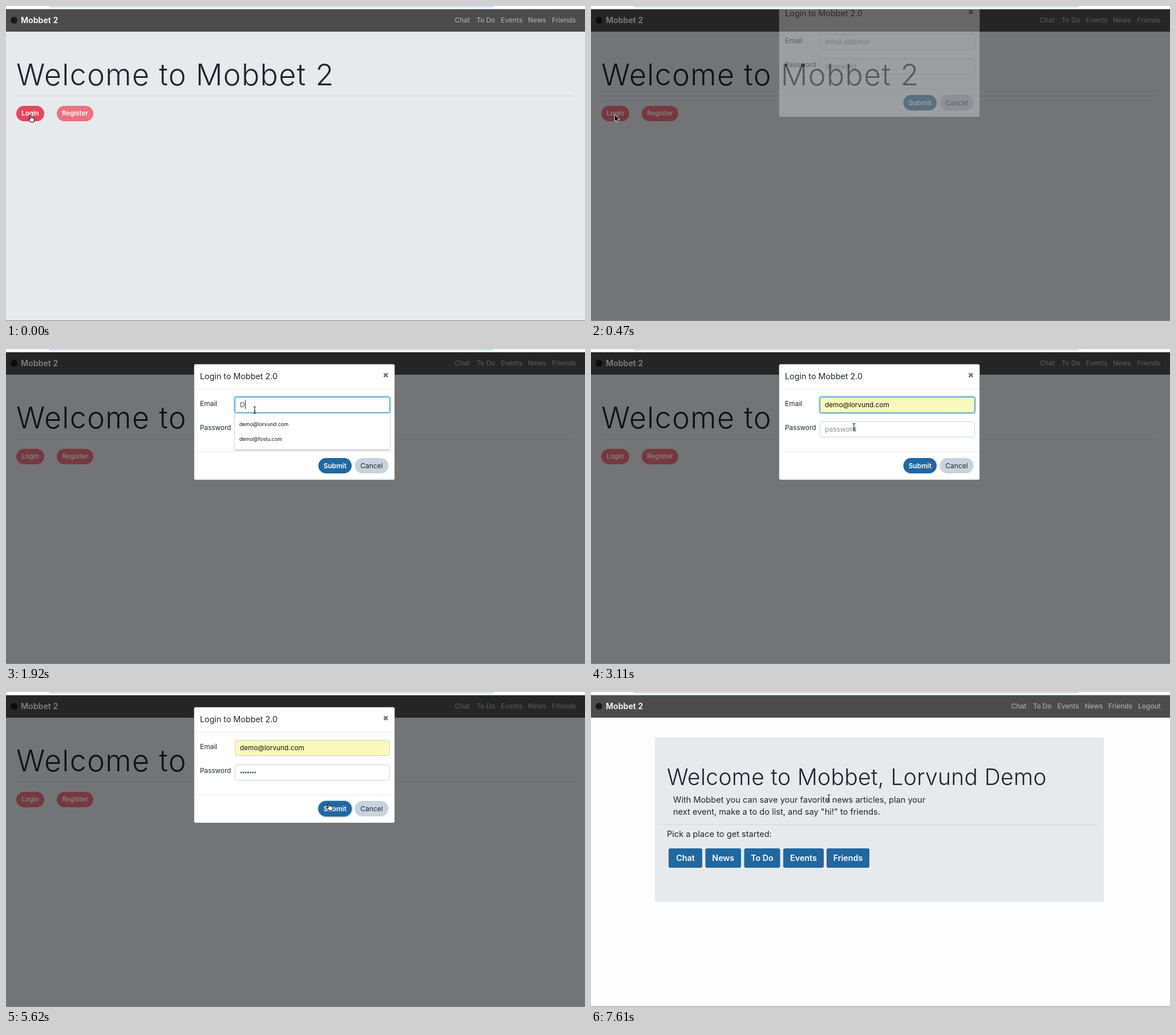
An HTML page with a canvas that plays this animation: 1015x552 px, repeating every 8 s.

```html
<!DOCTYPE html>
<html lang="en">
<head>
<meta charset="utf-8">
<title>Mobbet 2</title>
<style>
html, body { margin: 0; width: 100%; height: 100%; overflow: hidden; background: #fff; }
canvas { display: block; }
</style>
</head>
<body>
<canvas id="stage" width="1015" height="552"></canvas>
<script>
const W = 1015, H = 552, LOOP = 8000;
const stage = document.getElementById('stage').getContext('2d');
const layer = Object.assign(document.createElement('canvas'), { width: W, height: H }).getContext('2d');
let g = stage;

const INK = '#212529', PANEL = '#e7eaed', BLUE = '#2168a1', RULE = '#d2d5d8';
const MAIL = 'demo@lorvund.com';
const SUGGESTIONS = [MAIL, 'demo@fostu.com', 'test@lorvund.com', 'test@fostu.com', 'guest@lorvund.com', 'guest@fostu.com'];

function text(s, x, y, size, color = INK, weight = 400, align = 'left') {
  g.font = `${weight} ${size}px Inter, sans-serif`;
  g.fillStyle = color;
  g.textAlign = align;
  g.fillText(s, x, y);
}

function heading(s, x, y, size, spacing) {
  g.letterSpacing = spacing + 'px';
  text(s, x, y, size, INK, 340);
  g.letterSpacing = '0px';
}

function rect(x, y, w, h, color) {
  g.fillStyle = color;
  g.fillRect(x, y, w, h);
}

function round(x, y, w, h, r, fill, stroke, width = 1) {
  g.beginPath();
  g.roundRect(x, y, w, h, r);
  if (fill) { g.fillStyle = fill; g.fill(); }
  if (stroke) { g.strokeStyle = stroke; g.lineWidth = width; g.stroke(); }
}

function button(label, x, y, w, h, r, fill, size, color = '#fff', weight = 600) {
  round(x, y, w, h, r, fill);
  text(label, x + w / 2, y + h / 2 + size * .34, size, color, weight, 'center');
}

function navbar(items) {
  rect(0, 5, W, 40, '#4c4c4c');
  g.beginPath();
  g.arc(14, 25, 6, 0, 7);
  g.fillStyle = '#1d1814';
  g.fill();
  text('Mobbet 2', 26, 30, 14.2, '#fff', 600);
  for (const [label, x] of items) text(label, x, 29, 11.8, '#a9a9a9', 500, 'center');
}

function welcomePage(hover) {
  rect(0, 0, W, H, PANEL);
  navbar([['Chat', 800], ['To Do', 841], ['Events', 886.5], ['News', 931], ['Friends', 978]]);
  heading('Welcome to Mobbet 2', 18, 139, 52, 1.3);
  rect(18, 157, 975, 1, RULE);
  button('Login', 18, 175, 49, 27, 13.5, hover ? '#e9455b' : '#ee7081', 11.4);
  button('Register', 89, 175, 64, 27, 13.5, '#ee7081', 11.4);
}

function homePage() {
  rect(0, 0, W, H, '#fefefe');
  navbar([['Chat', 750], ['To Do', 791], ['Events', 836.5], ['News', 881.5], ['Friends', 928], ['Logout', 979]]);
  rect(112, 79.5, 787, 288, PANEL);
  heading('Welcome to Mobbet, Lorvund Demo', 133, 163, 39, .3);
  text('With Mobbet you can save your favorite news articles, plan your', 144, 194, 14.6);
  text('next event, make a to do list, and say "hi!" to friends.', 144, 215, 14.6);
  rect(123, 232, 765, 1, RULE);
  text('Pick a place to get started:', 133, 254, 14.6);
  const places = [['Chat', 136, 59], ['News', 200.5, 62.5], ['To Do', 268.5, 63], ['Events', 337, 71], ['Friends', 413, 75]];
  for (const [label, x, w] of places) button(label, x, 274, w, 34, 3, BLUE, 14.3);
}

function field(y, focus, fill = '#fff') {
  if (focus) round(400.5, y - .5, 273, 29, 4, null, '#a5d3f3', 3);
  round(401.5, y + .5, 271, 27, 3, fill, focus ? '#3d96d0' : '#ced4da');
}

function caret(x, y) {
  rect(x, y, 1, 15, '#222');
}

function suggestions(count, hover) {
  const h = count === 2 ? 63 : 165;
  g.save();
  g.shadowColor = 'rgba(0,0,0,.35)';
  g.shadowBlur = 3;
  g.shadowOffsetY = 1;
  rect(401, 113, 272, h, '#fff');
  g.restore();
  if (hover) rect(401, 119, 272, 25, '#e4e4e4');
  SUGGESTIONS.slice(0, count).forEach((s, i) => text(s, 409, 135 + i * 25.5, 9, '#111'));
}

function modal(t) {
  round(329.5, 26.5, 352, 203, 3, '#fff', 'rgba(0,0,0,.3)');
  text('Login to Mobbet 2.0', 340, 53, 14.3);
  g.strokeStyle = '#777';
  g.lineWidth = 2.8;
  g.beginPath();
  g.moveTo(662.5, 42.5); g.lineTo(669, 49);
  g.moveTo(669, 42.5); g.lineTo(662.5, 49);
  g.stroke();
  rect(330, 70, 351, 1, '#e9ecef');
  rect(330, 179.5, 351, 1, '#e9ecef');
  text('Email', 340, 100, 12);
  text('Password', 340, 142, 11.8);
  const submitted = t >= 5470;
  if (submitted) round(546.5, 190, 61, 29.5, 15, '#a4c4dc');
  button('Submit', 547.5, 191, 58.5, 27, 13.5, BLUE, 11.8);
  button('Cancel', 611.5, 191, 59, 27, 13.5, '#c9d3dd', 12, INK, 400);

  const filled = t >= 2960, onMail = t >= 1340 && t < 3400, onPass = t >= 3400 && !submitted;
  field(84, onMail, filled ? '#f9f9bb' : '#fff');
  field(127, onPass);
  if (filled) text(MAIL, 410, 102, 11.8, '#111');
  else if (t >= 1920) text('D', 410, 102, 12, '#495057');
  else text('email address', 410, 102, 12, '#868e96');
  if (onMail && !filled) caret(t < 1920 ? 410 : 419, 90);

  const dots = t < 3700 ? 0 : Math.min(7, Math.floor(2 + (t - 3700) / 118));
  if (!dots) text('password', 410, 145, 12, '#868e96');
  g.fillStyle = '#495057';
  for (let i = 0; i < dots; i++) {
    g.beginPath();
    g.arc(412.2 + i * 4.1, 141, 1.5, 0, 7);
    g.fill();
  }
  if (onPass) caret(410 + dots * 4.1, 133);
  if (onMail && !filled) suggestions(t < 1920 ? 6 : 2, t >= 2660);
}

// Pointer moves: start, end, target x, target y.
const MOVES = [
  [680, 1190, 436, 107],
  [2220, 2810, 460, 132],
  [3100, 3250, 462, 141],
  [4290, 4290, 422, 146],
  [4740, 5320, 565, 197],
  [6840, 7610, 417, 186]
];

function pointerAt(t) {
  let x = 42, y = 191;
  for (const [from, to, tx, ty] of MOVES) {
    if (t < from) break;
    const n = Math.round((to - from) / 148) + 1;
    const p = t >= to ? 1 : (Math.floor((t - from) / (to - from) * (n - 1)) + 1) / n;
    const e = p * p * (3 - 2 * p);
    x += (tx - x) * e;
    y += (ty - y) * e;
  }
  return [x, y];
}

const ARROW = new Path2D('M0 0V10.5L2.4 8.3 4.1 12 5.8 11.2 4.2 7.6H7.3Z');
const HAND = new Path2D('M-1 1Q0-.6 1 1V5Q2 4 3 5 4 4.4 5 5.4 6.4 5 6.6 6.6V9L5.4 12.5H0L-3.6 8Q-3.4 6-1 7.6Z');
const BEAM = new Path2D('M-2.5-6Q0-6 0-4.5Q0-6 2.5-6M0-4.5V4.5M-2.5 6Q0 6 0 4.5Q0 6 2.5 6M-1.5 2H1.5');

function pointer(t) {
  if (t >= 3700 && t < 4440) return; // hidden while typing
  const [x, y] = pointerAt(t);
  const hand = t < 320 || t >= 5170 && t < 5770;
  const arrow = t >= 320 && t < 1190 || t >= 2660 && t < 3100 || t >= 4890 && t < 5170;
  g.save();
  g.translate(x, y);
  g.lineJoin = 'round';
  if (hand) {
    g.translate(1, t < 320 ? 0 : -2);
    g.fillStyle = '#fff';
    g.strokeStyle = '#111';
    g.lineWidth = 1.1;
    g.fill(HAND);
    g.stroke(HAND);
  } else if (arrow) {
    g.strokeStyle = '#fff';
    g.lineWidth = 1.6;
    g.stroke(ARROW);
    g.fillStyle = '#000';
    g.fill(ARROW);
  } else {
    g.strokeStyle = '#222';
    g.lineWidth = 1.1;
    g.stroke(BEAM);
  }
  g.restore();
}

function browserEdge() {
  rect(0, 0, W, 5, '#fff');
  rect(0, 5, W, 1, '#a9a9a9');
  round(73, -20, 784, 21.5, 7, null, '#a9d5f3', 1.6);
  rect(0, 551, W, 1, '#85878a');
}

function draw(t) {
  if (t >= 5770) homePage();
  else {
    welcomePage(t < 320);
    rect(0, 0, W, H, `rgba(0,0,0,${t < 320 ? 0 : t < 470 ? .17 : .5})`);
    if (t >= 470) {
      const opening = t < 680;
      g = layer;
      g.clearRect(0, 0, W, H);
      modal(t);
      g = stage;
      g.globalAlpha = opening ? .3 : 1;
      g.drawImage(layer.canvas, 0, opening ? -35 : 0);
      g.globalAlpha = 1;
    }
  }
  browserEdge();
  pointer(t);
}

function tick() {
  draw(performance.now() % LOOP);
  requestAnimationFrame(tick);
}
tick();
</script>
</body>
</html>
```
